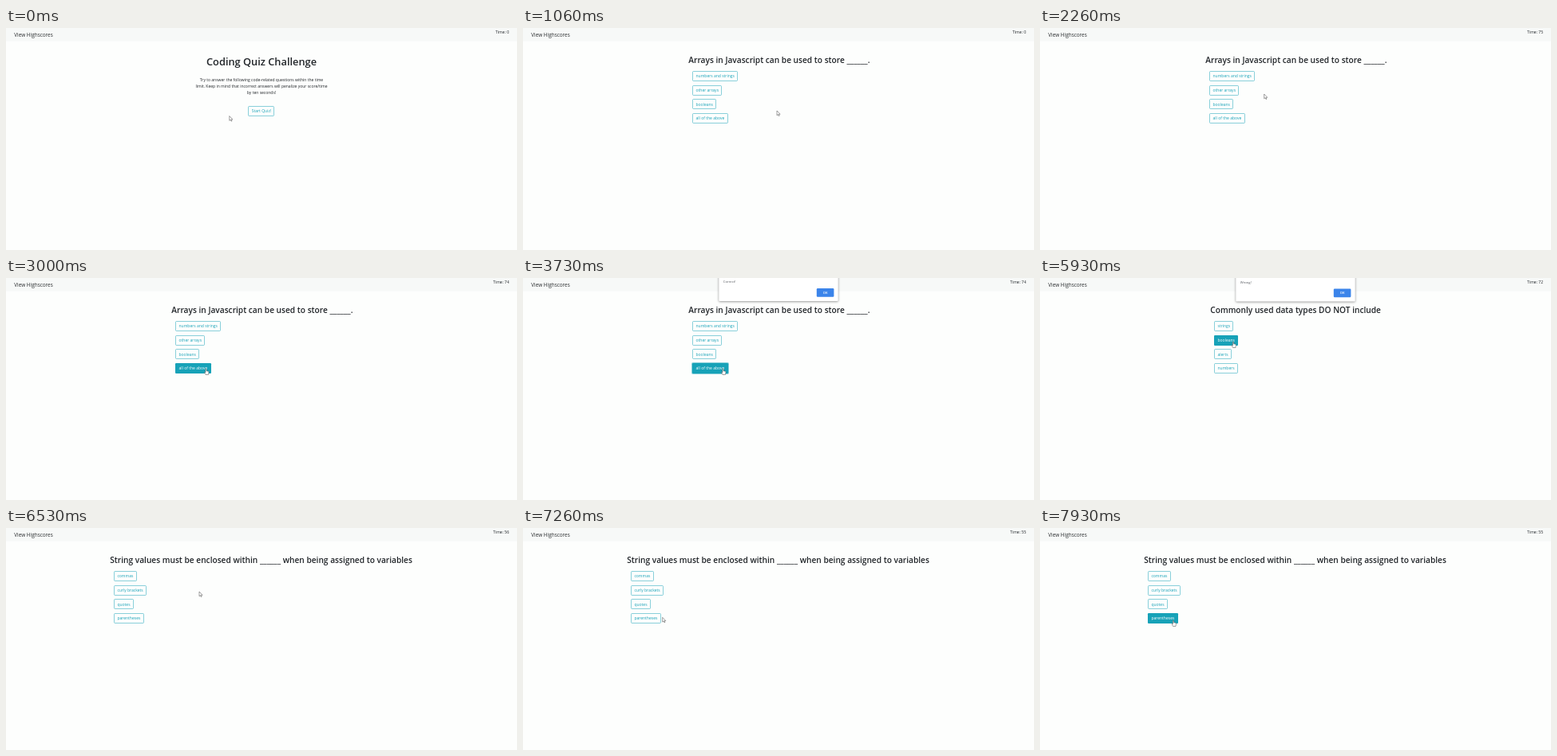
An HTML page with a canvas for the animation above (8000 ms loop, 640 by 279 pixels).

```html
<!DOCTYPE html>
<html lang="en">
<head>
<meta charset="utf-8">
<title>Coding Quiz</title>
<style>
  html, body { margin: 0; height: 100%; overflow: hidden; background: #fdfefd; }
  canvas { display: block; }
</style>
</head>
<body>
<canvas id="stage" width="640" height="279"></canvas>
<script>
const ctx = document.getElementById('stage').getContext('2d');
const LOOP = 8000, PAGE = '#fdfefd', INK = '#212529', TEAL = '#17a2b8';
const BODY = 5.03;

const questions = [
  { start: 1060, x: 207.3, title: 'Arrays in Javascript can be used to store ______.',
    answers: ['numbers and strings', 'other arrays', 'booleans', 'all of the above'],
    picked: 3, press: 3460, glow: true, alert: [3530, 4130], message: 'Correct!', alertY: 0 },
  { start: 4130, x: 213.3, title: 'Commonly used data types DO NOT include',
    answers: ['strings', 'booleans', 'alerts', 'numbers'],
    picked: 1, press: 5600, glow: false, alert: [5660, 6260], message: 'Wrong!', alertY: 0.6 },
  { start: 6260, x: 130.2, title: 'String values must be enclosed within ______ when being assigned to variables',
    answers: ['commas', 'curly brackets', 'quotes', 'parentheses'], alert: [LOOP, LOOP] }
];

// [time, value]
const clock = [[0, 0], [1990, 75], [2990, 74], [4130, 73], [5200, 72], [6260, 56], [7230, 55]];

// [time, x, y]
const pointerPath = [
  [60, 279.8, 110.6], [560, 318, 104], [1130, 318, 104], [1750, 280.7, 83], [2270, 280.7, 83],
  [2730, 250.5, 114], [4200, 250.5, 114], [4700, 263, 87.2], [4900, 263, 87.2],
  [5400, 242, 80], [6700, 242, 80], [7400, 167, 116]
];

const latest = (list, t, time) => list.filter(item => time(item) <= t).pop();

function pointerAt(t) {
  const i = pointerPath.findIndex(p => p[0] > t);
  if (i < 0) return pointerPath[pointerPath.length - 1].slice(1);
  if (i === 0) return pointerPath[0].slice(1);
  const [t0, x0, y0] = pointerPath[i - 1], [t1, x1, y1] = pointerPath[i];
  const u = (t - t0) / (t1 - t0), k = u * u * (3 - 2 * u);
  return [x0 + (x1 - x0) * k, y0 + (y1 - y0) * k];
}

function setFont(size, weight = 400) {
  ctx.font = `${weight} ${size}px "Open Sans", "Noto Sans", sans-serif`;
}

function text(str, x, y, size, { color = INK, align = 'left', weight = 400 } = {}) {
  setFont(size, weight);
  ctx.fillStyle = color;
  ctx.textAlign = align;
  ctx.fillText(str, x, y);
}

function box(x, y, w, h, r, color) {
  ctx.beginPath();
  ctx.roundRect(x, y, w, h, r);
  ctx.fillStyle = color;
  ctx.fill();
}

// Draws an outlined button and reports whether the pointer is over it.
function button(label, left, top, [px, py], glow) {
  setFont(BODY);
  const x = Math.round(left), y = Math.round(top), h = 13;
  const w = Math.round(ctx.measureText(label).width + 8.8);
  const hover = px >= x && px <= x + w && py >= y && py <= y + h;
  if (glow) box(x - 1, y - 1, w + 2, h + 2, 2, 'rgba(23,162,184,.5)');
  box(x, y, w, h, 1.3, hover ? TEAL : PAGE);
  ctx.beginPath();
  ctx.roundRect(x + 0.5, y + 0.5, w - 1, h - 1, 1);
  ctx.strokeStyle = 'rgba(23,162,184,.5)';
  ctx.lineWidth = 1;
  ctx.stroke();
  text(label, left + 4.4, top + 8.2, BODY, { color: hover ? '#fff' : TEAL });
  return hover;
}

function intro(t, pointer) {
  text('Coding Quiz Challenge', 320, 47, 12.8, { align: 'center', weight: 600 });
  ['Try to answer the following code-related questions within the time',
   'limit. Keep in mind that incorrect answers will penalize your score/time',
   'by ten seconds!'
  ].forEach((line, i) => text(line, 320, 66.7 + i * 8, BODY, { align: 'center' }));
  return button('Start Quiz!', 303.3, 98, pointer, t >= 800);
}

function question(q, t, pointer) {
  text(q.title, q.x, 44, 10.16, { weight: 600 });
  const hovers = q.answers.map((label, i) =>
    button(label, q.x + 4.8, 54.1 + i * 17.65, pointer, q.glow && i === q.picked && t >= q.press));
  return hovers.includes(true);
}

function dialog({ message, alertY: y }) {
  ctx.save();
  ctx.shadowColor = 'rgba(0,0,0,.45)';
  ctx.shadowBlur = 3;
  ctx.shadowOffsetY = 0.7;
  box(245.3, -5, 149.4, 34 + y, 1, '#fff');
  ctx.restore();
  text(message, 250.8, 6 + y, 4.2, { color: '#55595e' });
  box(367.8, 13 + y, 21.6, 10.7, 1.2, '#3b84ea');
  text('OK', 378.6, 19.8 + y, 4, { color: '#fff', align: 'center', weight: 600 });
}

function cursor([x, y], hand) {
  const shape = new Path2D(hand
    ? 'M-.6 .4Q0-.3 .6 .4V2.8L3 3.3Q3.6 3.5 3.5 4.2L3 7.5H-.4L-2 4.7Q-1.8 3.8-.6 4.9Z'
    : 'M0 0V5.8L1.4 4.6L2.3 6.6L3.2 6.2L2.3 4.3H4.1Z');
  ctx.save();
  ctx.translate(x, y);
  ctx.fillStyle = '#fff';
  ctx.strokeStyle = '#444';
  ctx.lineWidth = 0.5;
  ctx.fill(shape);
  ctx.stroke(shape);
  ctx.restore();
}

function draw(t) {
  const pointer = pointerAt(t), q = latest(questions, t, item => item.start);
  ctx.fillStyle = PAGE;
  ctx.fillRect(0, 0, 640, 279);
  ctx.fillStyle = '#f7f9f8';
  ctx.fillRect(0, 0, 640, 16.6);
  text('View Highscores', 10.3, 10.8, 6.42, { color: '#2c2f31' });
  text('Time: ' + latest(clock, t, item => item[0])[1], 630, 7, BODY, { align: 'right' });
  const hand = q ? question(q, t, pointer) : intro(t, pointer);
  if (q && t >= q.alert[0] && t < q.alert[1]) dialog(q);
  cursor(pointer, hand);
}

function frame() {
  draw(performance.now() % LOOP);
  requestAnimationFrame(frame);
}
frame();
</script>
</body>
</html>
```
